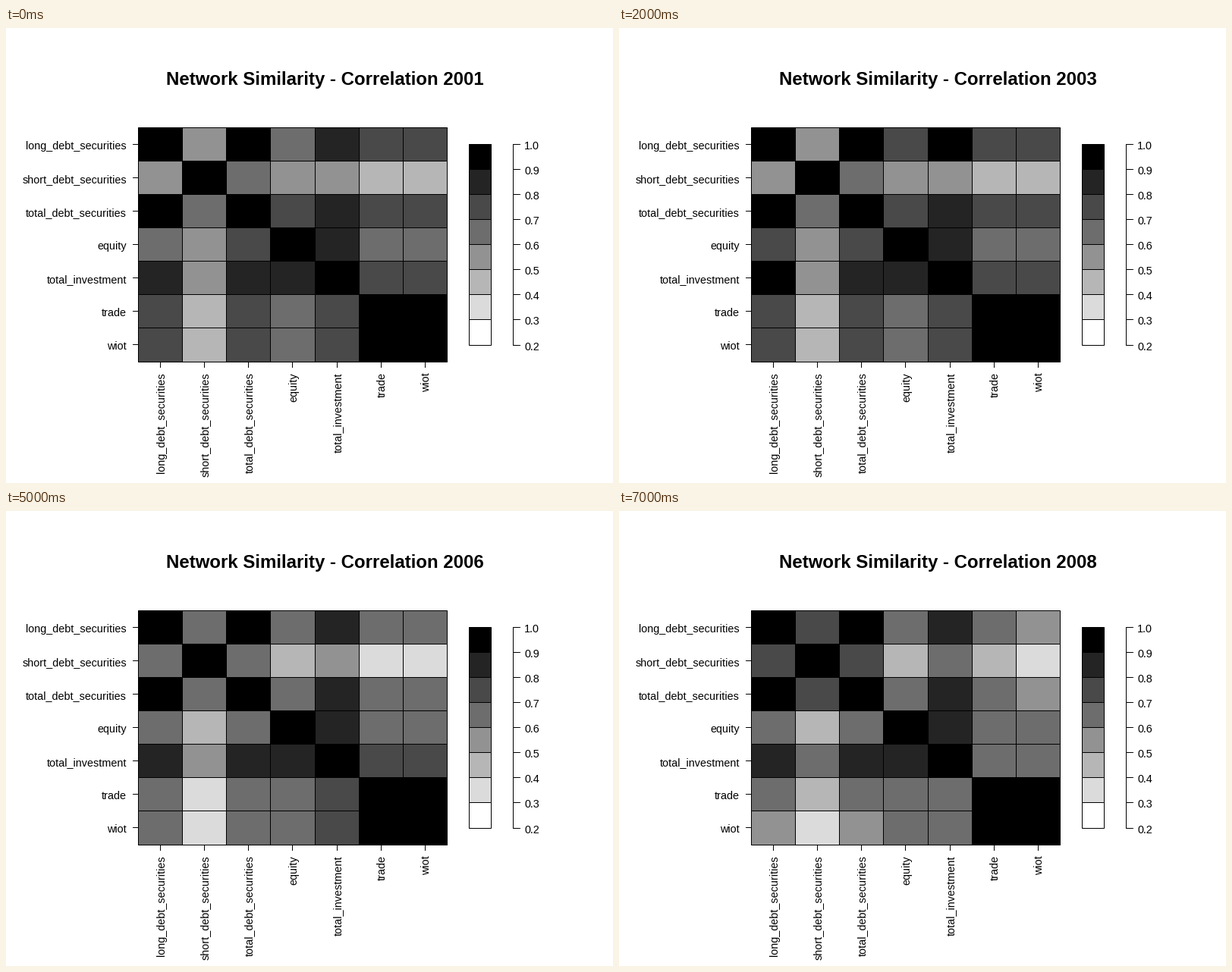
Write a matplotlib script that moves like this. It is 800x600 px and loops after 8000 ms.

```python
import numpy as np
import matplotlib.pyplot as plt
from matplotlib.animation import FuncAnimation
from matplotlib.patches import Rectangle

plt.rcParams["path.snap"] = False  # coordinates already sit on pixel centres

PT = 0.72  # points per pixel at 100 dpi
FONT = "Liberation Sans"
NAMES = ["long_debt_securities", "short_debt_securities",
         "total_debt_securities", "equity", "total_investment",
         "trade", "wiot"]
SHADES = ["#ffffff", "#dbdbdb", "#b6b6b6", "#929292",
          "#6d6d6d", "#494949", "#242424", "#000000"]

# Shade level of each pair per year: upper triangle, row by row
LEVELS = {
    2001: "374655 43322 5655 644 55 7",
    2002: "375655 43321 5655 644 55 7",
    2003: "375755 43322 5655 644 55 7",
    2004: "375654 32311 4644 744 55 7",
    2005: "474644 42321 4644 644 55 7",
    2006: "474644 42311 4644 644 55 7",
    2007: "474644 52322 4644 744 55 7",
    2008: "574643 52421 4643 644 44 7",
}
YEARS = sorted(LEVELS)
N = len(NAMES)

fig = plt.figure(figsize=(8, 6), dpi=100, facecolor="white")
ax = fig.add_axes([0, 0, 1, 1])
ax.set_xlim(0, 800)
ax.set_ylim(600, 0)
ax.axis("off")


def box(x0, y0, x1, y1, color):
    patch = Rectangle((x0 + 0.5, y0 + 0.5), x1 - x0, y1 - y0, facecolor=color,
                      edgecolor="black", linewidth=PT)
    return ax.add_patch(patch)


def line(x0, y0, x1, y1):
    ax.plot([x0 + 0.5, x1 + 0.5], [y0 + 0.5, y1 + 0.5], color="black",
            linewidth=PT, solid_capstyle="projecting")


def label(x, y, text, size=14.4, **style):
    return ax.text(x, y, text, fontsize=size * PT, family=FONT,
                   va="baseline", **style)


def similarity(year):
    grid = np.full((N, N), 7)
    for i, row in enumerate(LEVELS[year].split()):
        for j, level in enumerate(row, i + 1):
            grid[i, j] = grid[j, i] = int(level)
    return grid


xs = np.round(np.linspace(174, 581, N + 1))
ys = np.floor(np.linspace(131, 440, N + 1))
cells = [[box(xs[j], ys[i], xs[j + 1], ys[i + 1], "black") for j in range(N)]
         for i in range(N)]

for i, name in enumerate(NAMES):
    cx = np.floor((xs[i] + xs[i + 1]) / 2)
    cy = np.floor((ys[i] + ys[i + 1]) / 2)
    line(167, cy, 174, cy)
    line(cx, 440, cx, 447)
    label(159, cy + 7, name, ha="right")
    label(cx + 6, 454, name, ha="right", rotation=90, rotation_mode="anchor")

# Colour key with its axis
key = np.floor(np.linspace(418, 153, len(SHADES) + 1))
for low, high, shade in zip(key, key[1:], SHADES):
    box(610, high, 639, low, shade)
line(668, 153, 668, 418)
for k, y in enumerate(key):
    line(668, y, 677, y)
    label(683, y + 7, f"{0.2 + 0.1 * k:.1f}")

title = label(211, 75, "", size=24, weight="bold")


def draw(frame):
    year = YEARS[frame]
    title.set_text(f"Network Similarity - Correlation {year}")
    grid = similarity(year)
    for i in range(N):
        for j in range(N):
            cells[i][j].set_facecolor(SHADES[grid[i, j]])
    return [title]


anim = FuncAnimation(fig, draw, frames=len(YEARS), interval=1000,
                     repeat=True, repeat_delay=0, blit=False)
plt.show()
```
